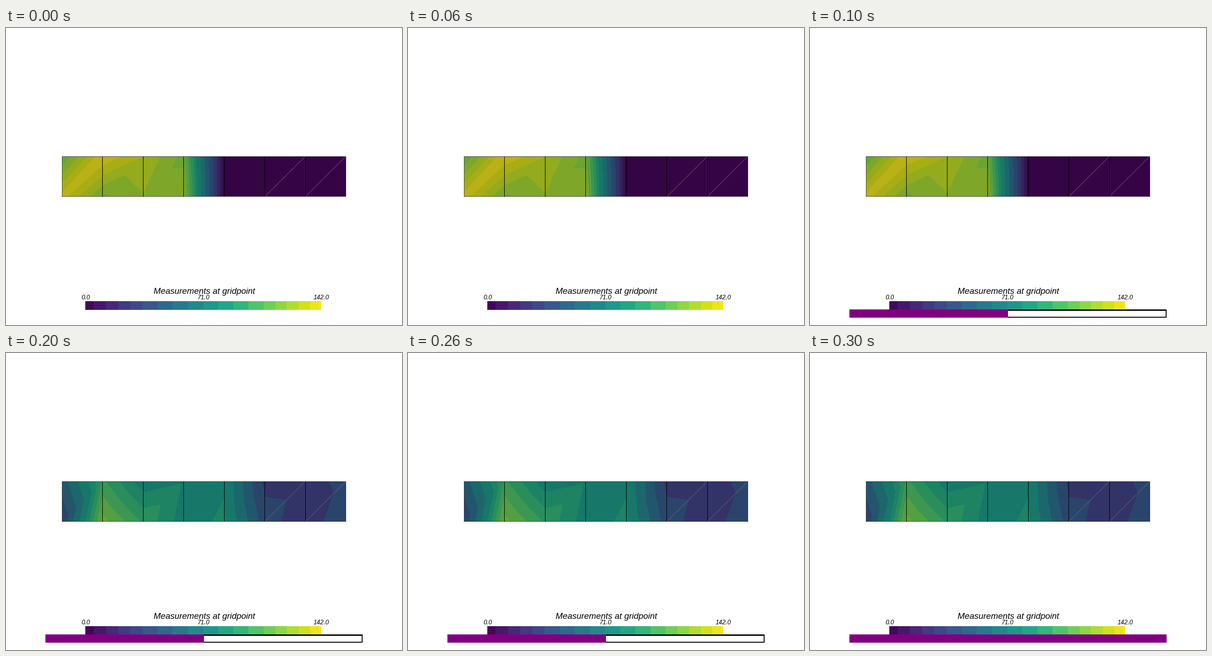
These frames come from a looping animation (864x648 px, 400 ms). A matplotlib script:

```python
import numpy as np
import matplotlib.pyplot as plt
from matplotlib.animation import FuncAnimation
from matplotlib.patches import Rectangle

W, H, DPI = 864, 648, 72
TOP, BOTTOM = 280, 368
N = 7
GRID = np.linspace(122.5, 741.5, N + 1)
SHADE = 0.765  # dimming of the lit surface

# Scalar at the upper and lower grid points, as a share of the full range
EARLY = ([0.80, 0.995, 0.922, 0.83, 0, 0, 0, 0],
         [0.98, 0.838, 0.879, 0.878, 0, 0, 0, 0])
LATE = ([0.365, 0.707, 0.55, 0.581, 0.577, 0.215, 0.206, 0.264],
        [0.255, 0.828, 0.688, 0.555, 0.602, 0.279, 0.18, 0.313])

fig = plt.figure(figsize=(W / DPI, H / DPI), dpi=DPI, facecolor="white")
ax = fig.add_axes([0, 0, 1, 1])
ax.axis("off")


def steps(knots, values):
    """Band edges, evenly spaced between the given knots."""
    return np.interp(np.arange(knots[-1] + 1), knots, values)


def rect(x0, y0, x1, y1, color, z=1):
    return ax.add_patch(Rectangle((x0, y0), x1 - x0, y1 - y0,
                                  fc=color, ec="none", lw=0, zorder=z))


def line(x0, y0, x1, y1, color="black", width=1.0):
    ax.plot([x0, x1], [y0, y1], color=color, lw=width, zorder=3,
            solid_capstyle="butt")


def label(x, y, text, size):
    ax.text(x, y, text, fontsize=size, family="Liberation Sans",
            style="italic", ha="center", va="baseline", zorder=6)


# Two triangles per cell; the scalar is linear across each of them
upper = np.arange(N)
lower = upper + N + 1
triangles = np.vstack([np.c_[upper, upper + 1, lower],
                       np.c_[upper + 1, lower, lower + 1]])
node_x = np.tile(GRID, 2)
node_y = np.repeat([TOP, BOTTOM], N + 1)

levels = steps([0, 1, 3, 8, 12, 17], [-0.01, 0.04, 0.153, 0.588, 0.806, 1])
mids = (levels[:-1] + levels[1:]) / 2
shades = plt.cm.viridis(mids)[:, :3] * SHADE


def field(values):
    return ax.tricontourf(node_x, node_y, triangles, np.ravel(values),
                          levels=levels, colors=shades, zorder=1)


early, late = field(EARLY), field(LATE)

# Cell edges sit on whole pixels
columns = np.floor(GRID)
for x in columns[1:-1]:
    line(x, TOP, x, BOTTOM, width=1.1)
for x in columns[[0, -1]]:
    line(x, TOP, x, BOTTOM, "#30303c", 0.8)
for y in (TOP, BOTTOM - 1):
    line(columns[0], y, columns[-1], y, "#30303c", 0.8)
for a, b in zip(GRID[5:], GRID[6:]):
    line(a, BOTTOM, b, TOP, "#77707e", 0.7)

# Colour scale
edges = steps([0, 1, 5, 13, 17, 18, 19], [173, 191, 298, 562, 664, 683, 688])
for a, b in zip(edges, edges[1:]):
    rect(a, 596, b, 615, plt.cm.viridis(((a + b) / 2 - 173) / 515))
label(432.3, 579.5, "Measurements at gridpoint", 18.75)
for share in (0, 0.5, 1):
    label(173.5 + 514 * share, 591.5, f"{142 * share:.1f}", 13.7)

# Progress bar
BAR_X, BAR_W = 86, 692
outline = rect(BAR_X, 614, BAR_X + BAR_W, 632, "black", 7)
inside = rect(BAR_X + 3, 617, BAR_X + BAR_W - 2, 629.5, "white", 8)
fill = rect(BAR_X, 614, BAR_X, 632, "#800080", 9)

ax.set(xlim=(0, W), ylim=(H, 0))


def update(i):
    early.set_visible(i < 2)
    late.set_visible(i >= 2)
    done = (i + 1) // 2 / 2
    for part in (outline, inside, fill):
        part.set_visible(done > 0)
    fill.set_width(BAR_W * done)
    return []


anim = FuncAnimation(fig, update, frames=4, interval=100,
                     init_func=lambda: update(0), repeat=True,
                     repeat_delay=0, blit=False)
plt.show()
```
